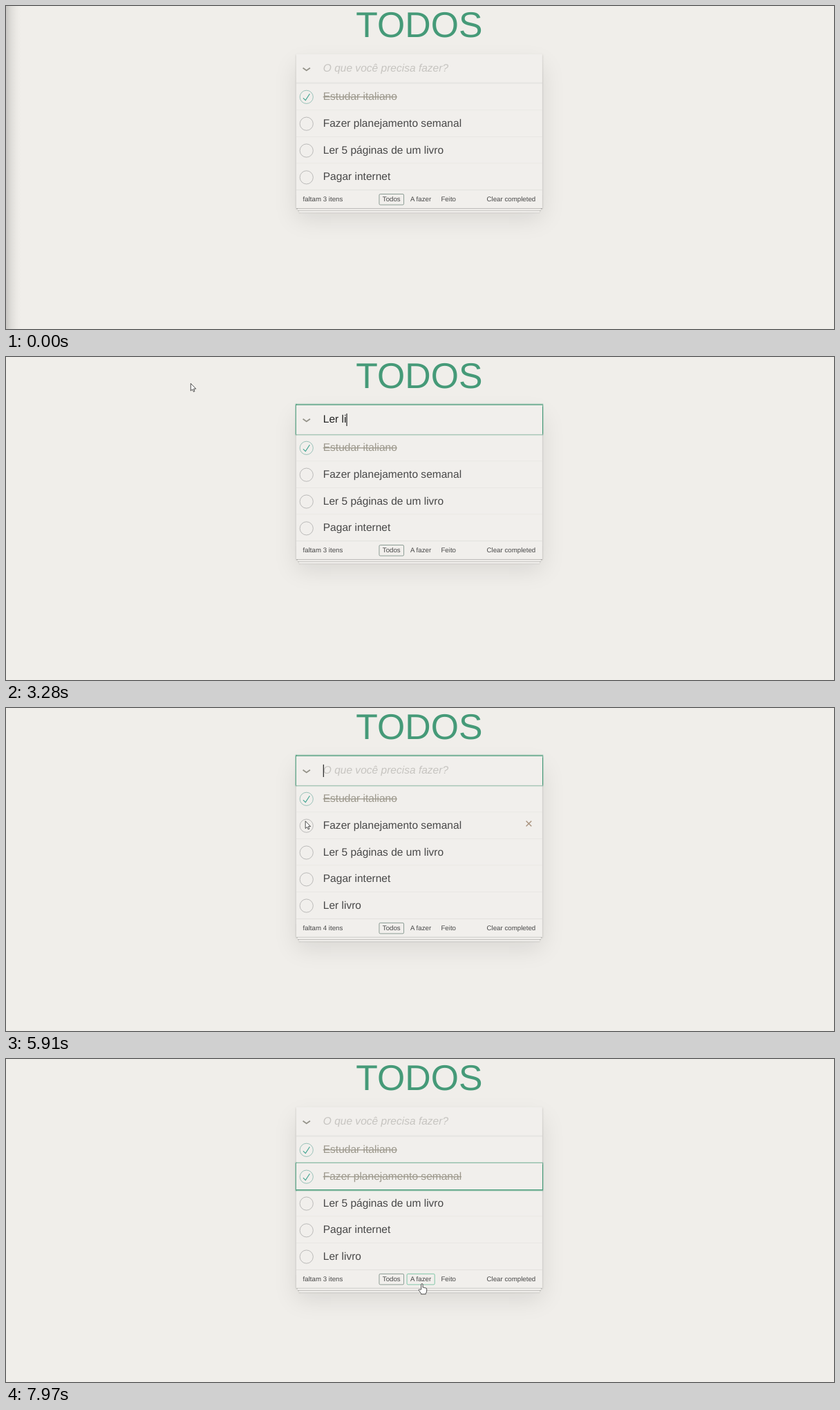
Animation, 1198 px wide and 468 px high, one loop 8 s. Source, as an HTML page:

```html
<!DOCTYPE html>
<html lang="pt-BR">
<head>
<meta charset="utf-8">
<title>Todos</title>
<style>
  html, body { margin: 0; width: 100%; height: 100%; overflow: hidden; background: #f0eeea; }
  body { position: relative; font: 24px/1.2 "Liberation Sans", Arial, sans-serif; color: #484848; text-rendering: geometricPrecision; }
  #edge { position: absolute; left: 0; top: 0; width: 22px; height: 100%;
    background: linear-gradient(90deg, rgba(0,0,0,.17), rgba(0,0,0,.07) 35%, rgba(0,0,0,.02) 70%, transparent); }
  h1 { position: absolute; left: 0; top: 1px; width: 1195.8px; margin: 0; text-align: center;
    font-size: 51.78px; line-height: 52px; font-weight: 400; color: #459a78; }
  #app { position: absolute; left: 0; top: 0; width: 550px; background: #f1efec;
    transform-origin: 0 0; transform: translate(419.9px, 69.6px) scale(.6473);
    box-shadow: 0 2px 4px rgba(0,0,0,.2), 0 25px 50px rgba(0,0,0,.1); }
  #entry { position: relative; height: 65px; line-height: 66px; padding-left: 60px; white-space: pre; color: #222;
    box-shadow: inset 0 -2px 1px rgba(0,0,0,.03); }
  #hint { position: absolute; left: 60px; top: 0; font-style: italic; color: #c6c4c0; }
  #caret { position: absolute; top: 19px; width: 1.5px; height: 28px; background: #333; }
  #chevron { position: absolute; left: 13px; top: 27px; }
  #app .ring { box-shadow: 0 0 2px 2px #459a78; }
  #main { position: relative; border-top: 1px solid #dbdad6; }
  ul { list-style: none; margin: 0; padding: 0; }
  .row { position: relative; height: 58.8px; border-bottom: 1px solid #e4e2de; }
  .row.last { border-bottom: 0; }
  .row label { display: block; padding: 16.1px 15px 13.9px 60px; height: 28.8px; line-height: 28.8px; white-space: pre; }
  .row svg { position: absolute; left: 0; top: 10.3px; overflow: visible; }
  .row circle { fill: none; stroke: #949494; stroke-width: 3; }
  .row path { fill: #3ea390; visibility: hidden; }
  .row.done circle { stroke: #59a193; }
  .row.done path { visibility: visible; }
  .row.done label { text-decoration: line-through; }
  .kill { position: absolute; right: 10px; top: 10.8px; width: 40px; text-align: center;
    font-size: 30px; line-height: 30px; color: #a8917c; visibility: hidden; }
  #foot { position: relative; box-sizing: border-box; height: 41px; padding: 10.7px 15px; border-top: 1px solid #dbdad6;
    font-size: 15px; line-height: 19.6px; }
  #foot::before { content: ""; position: absolute; left: 0; right: 0; bottom: 0; height: 30px;
    box-shadow: 0 1px 1px rgba(0,0,0,.2), 0 8px 0 -3px #f1efec, 0 9px 1px -3px rgba(0,0,0,.2),
      0 16px 0 -6px #f1efec, 0 17px 2px -6px rgba(0,0,0,.2); }
  #clear { position: absolute; right: 15px; top: 10.7px; }
  #filters { position: absolute; left: 0; right: 0; top: 10.7px; text-align: center; }
  #filters li { display: inline; }
  #filters a { margin: 3px; padding: 3px 7px; border: 1px solid transparent; border-radius: 3px; }
  #filters a.hover { border-color: #45b083; }
  #filters a.on { border-color: #567066; }
  #cursor { position: absolute; left: 0; top: 0; overflow: visible; }
  #cursor path { fill: #fff; stroke: #222; stroke-width: .8; stroke-linejoin: round; }
  #cursor #beam { fill: none; stroke: #333; stroke-width: 1; }
</style>
</head>
<body>
<div id="edge"></div>
<h1>TODOS</h1>
<div id="app">
  <div id="entry"><svg id="chevron" width="20" height="14"><path d="M2 4.2L10 9.8L18 4.2" fill="none" stroke="#949289" stroke-width="2.8"/></svg><span id="hint">O que você precisa fazer?</span><span id="typed"></span><i id="caret"></i></div>
  <div id="main"><ul id="list"></ul></div>
  <div id="foot">
    <span id="count"></span>
    <ul id="filters"><li><a class="on">Todos</a></li><li><a>A fazer</a></li><li><a>Feito</a></li></ul>
    <span id="clear">Clear completed</span>
  </div>
</div>
<svg id="cursor" width="1" height="1">
  <path id="arrow" d="M.3 .3V11L2.8 8.8L4.4 12.3L6 11.6L4.5 8.1H7.8Z"/>
  <path id="beam" d="M-2.5 -5.5H-.8L0 -4.9L.8 -5.5H2.5M-2.5 5.5H-.8L0 4.9L.8 5.5H2.5M0 -4.9V4.9"/>
  <path id="hand" d="M-1.3 8.5V1.3a1.2 1.2 0 0 1 2.4 0V5.6q1.2-.7 2 .4q1.3-.6 2 .5q1.6-.3 1.6 1.3V10.5q0 2-1.4 3.6V15.2H-1.5V14L-4.4 10.2q-.8-1.2 0-1.8q.9-.5 1.9.5z"/>
</svg>
<script>
const LOOP = 8000, TICK = 70, BLINK = 530;
const APP = { x: 419.9, y: 69.6, scale: .6473, width: 550, entry: 65, row: 59.8 };
const APPEAR = 120, FOCUS = 1150, TYPE = 2080, TYPED = 3750, ADD = 4150, PRESS = 6320, CHECK = 6390, FADE = 400;
const WORD = 'Ler livro';
const OPEN = [72, 72, 72], DONE = [157, 153, 141];

const smooth = u => u * u * (3 - 2 * u);
const easeOut = u => 1 - (1 - u) ** 3;
const clamp = u => Math.max(0, Math.min(1, u));
const mix = (a, b, u) => a + (b - a) * u;

// Each glide starts where the one before ended; bend bows the path sideways.
const START = { x: 1049, y: 400 };
const GLIDES = [
  { from: APPEAR, to: 810, x: 523, y: 82, bend: -.04, ease: easeOut },
  { from: 810, to: FOCUS, x: 520, y: 84 },
  { from: FOCUS, to: 1420, x: 267, y: 38 },
  { from: 4850, to: 5200, x: 383, y: 63 },
  { from: 5350, to: 6050, x: 441, y: 174, bend: .1 },
  { from: 6530, to: 7220, x: 636, y: 325, bend: .1 },
  { from: 7220, to: 7640, x: 602, y: 325.5 }
];

const $ = id => document.getElementById(id);
const show = (el, on) => { el.style.visibility = on ? 'visible' : 'hidden'; };

const rows = ['Estudar italiano', 'Fazer planejamento semanal', 'Ler 5 páginas de um livro', 'Pagar internet', WORD].map(text => {
  const li = document.createElement('li');
  li.className = 'row';
  li.innerHTML = `<svg width="40" height="40" viewBox="-10 -18 100 135">
    <circle cx="50" cy="50" r="50"/><path d="M72 25L42 71 27 56l-4 4 20 20 34-52z"/></svg>
    <label>${text}</label><span class="kill">×</span>`;
  $('list').append(li);
  return { li, label: li.querySelector('label'), kill: li.querySelector('.kill') };
});
const filters = [...document.querySelectorAll('#filters a')];

function cursorAt(t) {
  let p = START;
  for (const { from, to, x, y, bend = 0, ease = smooth } of GLIDES) {
    if (t < from) break;
    const held = Math.floor((t - from) / TICK) * TICK;
    const u = t >= to ? 1 : ease(held / (to - from));
    const bow = 2 * u * (1 - u) * bend;
    p = {
      x: mix(p.x, x, u) - bow * (y - p.y),
      y: mix(p.y, y, u) + bow * (x - p.x)
    };
  }
  return p;
}

function drawEntry(t) {
  const focused = t >= FOCUS && t < PRESS;
  const pace = (TYPED - TYPE) / (WORD.length - 1);
  const keys = Math.min(WORD.length, Math.max(0, Math.floor((t - TYPE) / pace + 1)));
  const typed = t < ADD ? WORD.slice(0, keys) : '';
  const lastKey = keys ? TYPE + (keys - 1) * pace : FOCUS;
  $('typed').textContent = typed;
  show($('hint'), !typed);
  show($('caret'), focused && Math.floor((t - lastKey) / BLINK) % 2 === 0);
  $('entry').classList.toggle('ring', focused);
  show($('edge'), t < FOCUS);
}

function drawList(t) {
  const total = t < ADD ? rows.length - 1 : rows.length;
  const fade = smooth(clamp((t - CHECK) / FADE));
  rows.forEach(({ li, label }, i) => {
    const tint = i === 0 ? 1 : i === 1 ? fade : 0;
    li.style.display = i < total ? '' : 'none';
    li.classList.toggle('last', i === total - 1);
    li.classList.toggle('done', i === 0 || (i === 1 && t >= CHECK));
    label.classList.toggle('ring', i === 1 && t >= PRESS);
    label.style.color = `rgb(${OPEN.map((c, k) => Math.round(mix(c, DONE[k], tint)))})`;
  });
  $('count').textContent = `faltam ${total - (t < CHECK ? 1 : 2)} itens`;
}

function drawCursor(t) {
  const { x, y } = cursorAt(t);
  const px = (x - APP.x) / APP.scale, py = (y - APP.y) / APP.scale;
  const inside = px >= 0 && px <= APP.width;
  const over = inside ? Math.floor((py - APP.entry - 1) / APP.row) : -1;
  rows.forEach(({ li, kill }, i) => show(kill, i === over && t >= APPEAR && li.style.display !== 'none'));

  let onLink = false;
  for (const a of filters) {
    const r = a.getBoundingClientRect();
    const hit = x >= r.left && x <= r.right && y >= r.top - 1 && y <= r.bottom + 1;
    a.classList.toggle('hover', hit);
    onLink = onLink || hit;
  }
  const onEntry = inside && px > 40 && py >= 0 && py < APP.entry;
  const shape = onLink ? 'hand' : onEntry ? 'beam' : 'arrow';
  for (const id of ['arrow', 'beam', 'hand']) show($(id), t >= APPEAR && id === shape);
  $('cursor').style.transform = `translate(${x}px, ${y}px)`;
}

function draw(t) {
  drawEntry(t);
  drawList(t);
  drawCursor(t);
}

const begin = performance.now();
function tick(now) {
  draw(Math.max(0, now - begin) % LOOP);
  requestAnimationFrame(tick);
}
draw(0);
requestAnimationFrame(tick);
</script>
</body>
</html>
```
